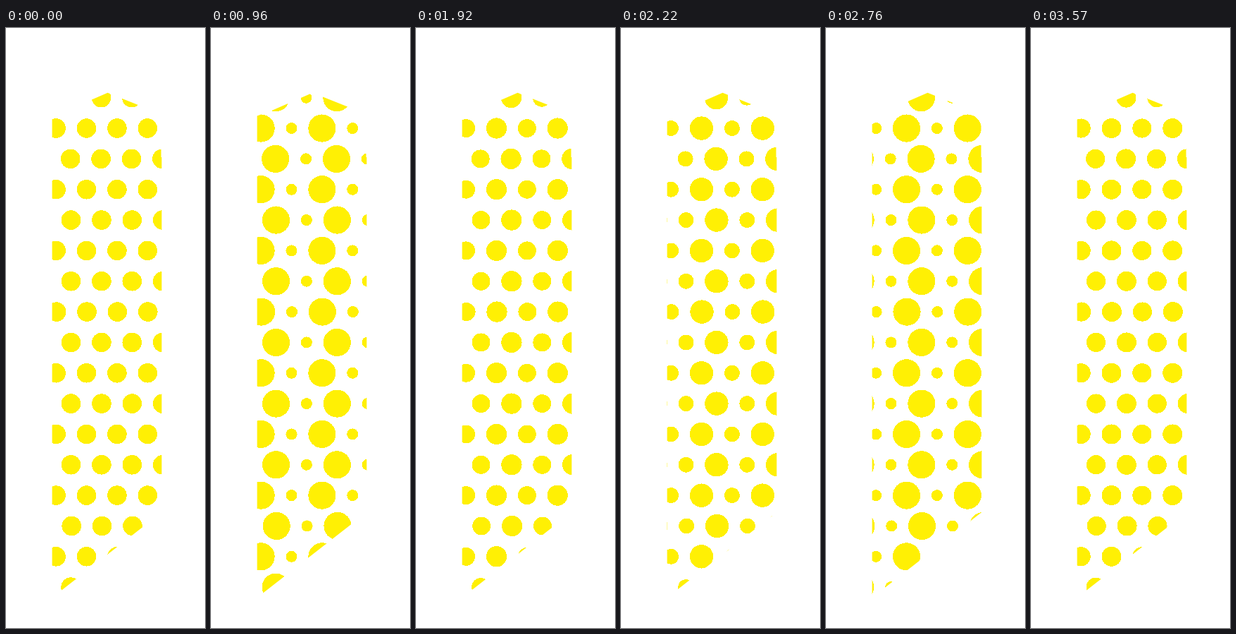
An HTML page for the animation above (3.6 s loop, 283 by 850 pixels).

```html
<!DOCTYPE html>
<html lang="en">
<head>
<meta charset="utf-8">
<title>Pulsing dots</title>
<style>
  html, body { margin: 0; width: 100%; height: 100%; overflow: hidden; background: #fff; }
  svg { display: block; fill: #fff004; shape-rendering: crispEdges; }
</style>
</head>
<body>
<svg width="283" height="850" viewBox="0 0 283 850">
  <clipPath id="banner">
    <path d="M65.6 124.5 L84 118 L144.5 91.8 L220.6 122 V183 H221.4 V686 L65.6 807 Z"/>
  </clipPath>
  <g id="dots" clip-path="url(#banner)"></g>
</svg>
<script>
const PERIOD = 3600, STEP = 43.4, ROWS = 17, COLUMNS = 5;
const BASE_RADIUS = 13.8, SWING = 6.2;
const rowShift = { 0: -0.4, 2: -0.8, 7: 0.5, 14: 0.7, 16: -0.4 };
const group = document.getElementById('dots');
const dots = [];

for (let row = 0; row < ROWS; row++) {
  const left = (row % 2 ? 27.7 : 49.1) + (rowShift[row] || 0);
  for (let column = 0; column < COLUMNS; column++) {
    const circle = document.createElementNS('http://www.w3.org/2000/svg', 'circle');
    circle.setAttribute('cx', left + column * STEP);
    circle.setAttribute('cy', 98.7 + row * 43.34);
    group.append(circle);
    dots.push({ circle, sign: column % 2 ? 1 : -1 });
  }
}

// Triangle wave: 0 → 1 → 0 → -1 → 0 over one period
function triangle(phase) {
  return 1 - Math.abs(((phase + 0.25) % 1) * 4 - 2);
}

function draw(now) {
  const wave = SWING * triangle((now % PERIOD) / PERIOD);
  for (const { circle, sign } of dots) circle.setAttribute('r', BASE_RADIUS + sign * wave);
  requestAnimationFrame(draw);
}
draw(performance.now());
</script>
</body>
</html>
```
